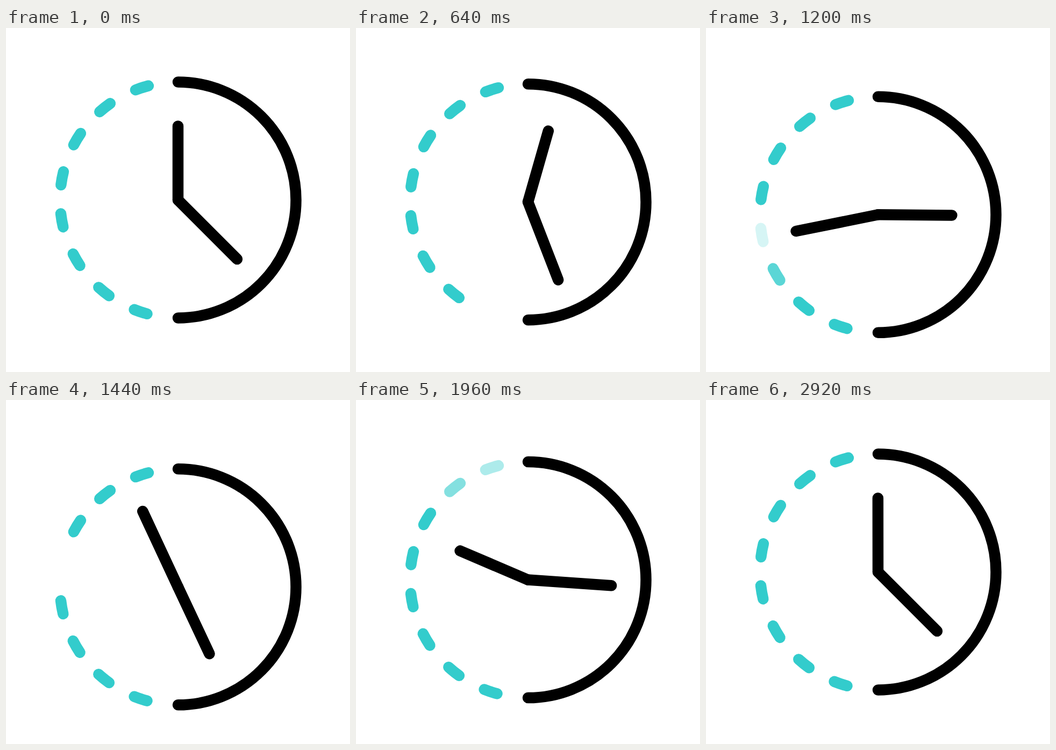
Write an HTML page that moves like this. It is 640 by 640 pixels and loops after 3000 ms.

```html
<!DOCTYPE html>
<html lang="en">
<head>
<meta charset="utf-8">
<title>Clock</title>
<style>
  html, body { margin: 0; width: 100%; height: 100%; overflow: hidden; background: #fff; }
  svg { display: block; width: 100%; height: 100%; }
  path { fill: none; stroke: #000; stroke-width: 20.5; stroke-linecap: round; }
  #dashes path { stroke: #33cccc; }
</style>
</head>
<body>
<svg viewBox="0 0 640 640">
  <g id="clock">
    <g id="dashes"></g>
    <path d="M320 100.5A219.5 219.5 0 0 1 320 539.5"/>
    <path id="short" d="M320 320V182.6"/>
    <path id="long" d="M320 320V164.5"/>
  </g>
</svg>
<script>
  const LOOP = 3000, STEP = 40, CENTER = 320, RADIUS = 219.5;
  const DASHES = 8, FADE = 200, FIRST_FADE = 640;
  const DROP = 28;
  const byId = id => document.getElementById(id);
  const clock = byId('clock'), shortHand = byId('short'), longHand = byId('long');

  // Angle in degrees, clockwise from the bottom of the dial
  function rimPoint(deg) {
    const a = deg * Math.PI / 180;
    return `${CENTER - RADIUS * Math.sin(a)} ${CENTER + RADIUS * Math.cos(a)}`;
  }

  const dashes = Array.from({ length: DASHES }, (_, i) => {
    const start = 15.2 + 20.53 * i;
    const dash = document.createElementNS('http://www.w3.org/2000/svg', 'path');
    dash.setAttribute('d', `M${rimPoint(start)}A${RADIUS} ${RADIUS} 0 0 1 ${rimPoint(start + 6.55)}`);
    return byId('dashes').appendChild(dash);
  });

  // cubic-bezier(.6, 0, .4, 1), solved by bisection
  function ease(x) {
    if (x <= 0) return 0;
    if (x >= 1) return 1;
    let lo = 0, hi = 1, s;
    for (let i = 0; i < 30; i++) {
      s = (lo + hi) / 2;
      const at = 1.8 * s * (1 - s) ** 2 + 1.2 * s * s * (1 - s) + s ** 3;
      if (at < x) lo = s; else hi = s;
    }
    return s * s * (3 - 2 * s);
  }

  const progress = (t, from, to) => ease((t - from) / (to - from));

  function turn(hand, deg) {
    hand.setAttribute('transform', `rotate(${deg} ${CENTER} ${CENTER})`);
  }

  function draw(t) {
    const y = DROP * (progress(t, 330, 1355) - progress(t, 1355, 2585));
    clock.setAttribute('transform', `translate(0 ${y})`);
    turn(shortHand, 360 * progress(t, 85, 2957));
    turn(longHand, 135 + 360 * progress(t, 13, 2745));
    dashes.forEach((dash, i) => {
      const away = Math.abs(t - FIRST_FADE - FADE * i);
      dash.setAttribute('opacity', Math.min(1, away / FADE));
    });
  }

  const began = performance.now();
  function tick() {
    const t = (performance.now() - began) % LOOP;
    draw(Math.floor(t / STEP) * STEP);
    requestAnimationFrame(tick);
  }
  tick();
</script>
</body>
</html>
```
